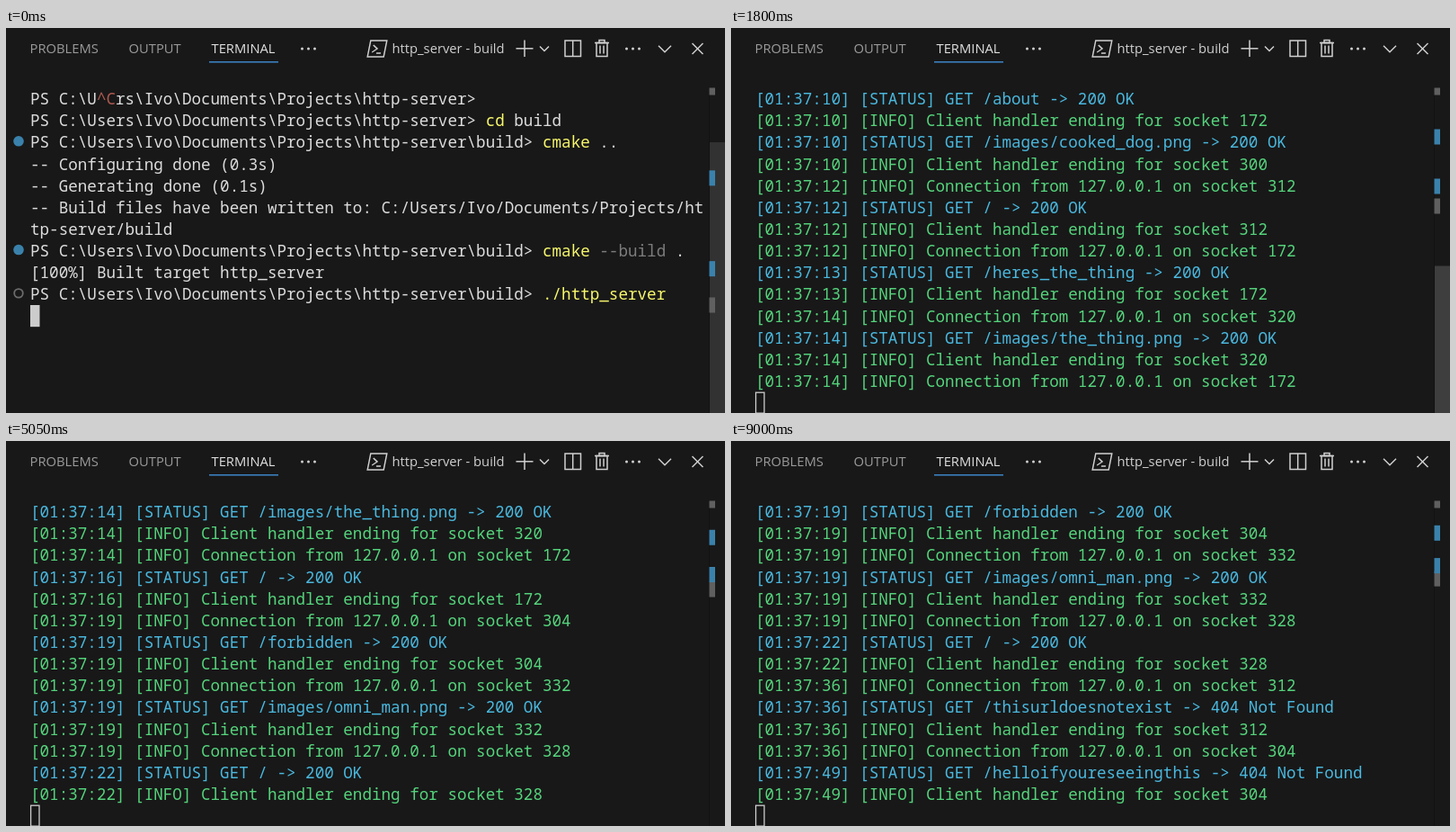
Animation of 800 by 428 pixels, one loop 9050 ms. Source, as an HTML page with a canvas:

```html
<!DOCTYPE html>
<html lang="en">
<head>
<meta charset="utf-8">
<title>Terminal</title>
<style>
  html, body { margin: 0; width: 100%; height: 100%; overflow: hidden; background: #181818; }
  canvas { display: block; }
</style>
</head>
<body>
<canvas id="stage" width="800" height="428"></canvas>
<script>
const ctx = document.getElementById('stage').getContext('2d');
const WIDTH = 800, HEIGHT = 428, LOOP = 9050, STEP = 50;
const LEFT = 27, TOP = 66.5, CHAR = 10.555, ROW = 24.15, VISIBLE_ROWS = 15;
const MONO = '500 17.59px "Noto Sans Mono", "DejaVu Sans Mono", monospace';
const SANS = '14.75px "Open Sans", "Noto Sans", sans-serif';
const BG = '#181818', WHITE = '#dcdcdc', ICON = '#d0d0d0', YELLOW = '#f8f86c', DIM = '#7c7c7c';
const RED = '#b05a52', GREEN = '#55d47c', CYAN = '#4ab8de', BLUE = '#3a82ac', GRAY = '#606060';

// Each row is a list of [text, color] segments.
const home = '\\Ivo\\Documents\\Projects\\http-server';
const prompt = dir => ['PS C:\\Users' + home + dir + '> ', WHITE];
const plain = text => [[text, WHITE]];
const initialRows = [
  [['PS C:\\U', WHITE], ['^C', RED], ['rs' + home + '>', WHITE]],
  [prompt(''), ['cd', YELLOW], [' build', WHITE]],
  [prompt('\\build'), ['cmake', YELLOW], [' ..', WHITE]],
  plain('-- Configuring done (0.3s)'),
  plain('-- Generating done (0.1s)'),
  plain('-- Build files have been written to: C:/Users/Ivo/Documents/Projects/ht'),
  plain('tp-server/build'),
  [prompt('\\build'), ['cmake', YELLOW], [' --build', DIM], [' .', WHITE]],
  plain('[100%] Built target http_server'),
  [prompt('\\build'), ['./http_server', YELLOW]],
];

// "second socket" opens a connection; a path after it answers and closes that connection.
const traffic = `
  07 296 | 07 296 / | 07 172 | 07 300 | 10 172 /about | 10 300 /images/cooked_dog.png
  12 312 | 12 312 / | 12 172 | 13 172 /heres_the_thing
  14 320 | 14 320 /images/the_thing.png | 14 172 | 16 172 /
  19 304 | 19 304 /forbidden | 19 332 | 19 332 /images/omni_man.png | 19 328 | 22 328 /
  36 312 | 36 312 /thisurldoesnotexist | 36 304 | 49 304 /helloifyoureseeingthis`;

const log = traffic.trim().split(/\n|\|/).flatMap(entry => {
  const [second, socket, path] = entry.trim().split(' ');
  const time = (second - 5.4) * 200; // the clock runs five times as fast
  const line = (text, color) => ({ time, row: [[`[01:37:${second}] ${text}`, color]] });
  if (!path) return [line('[INFO] Connection from 127.0.0.1 on socket ' + socket, GREEN)];
  const status = /this|hello/.test(path) ? '404 Not Found' : '200 OK';
  return [
    line(`[STATUS] GET ${path} -> ${status}`, CYAN),
    line('[INFO] Client handler ending for socket ' + socket, GREEN),
  ];
});

function box(color, x, y, w, h) {
  ctx.fillStyle = color;
  ctx.fillRect(x, y, w, h);
}

function outline(color, width, x, y, w, h) {
  ctx.strokeStyle = color;
  ctx.lineWidth = width;
  ctx.strokeRect(x, y, w, h);
}

function line(...points) {
  ctx.strokeStyle = ICON;
  ctx.lineWidth = 1.5;
  ctx.beginPath();
  for (const [x, y] of points) ctx.lineTo(x, y);
  ctx.stroke();
}

function circle(x, y, r) {
  ctx.beginPath();
  ctx.arc(x, y, r, 0, 2 * Math.PI);
}

function label(text, x, color) {
  ctx.font = SANS;
  ctx.fillStyle = color;
  ctx.fillText(text, x, 28.3);
}

function dots(x) {
  ctx.fillStyle = ICON;
  for (const dx of [-7, 0, 7]) { circle(x + dx, 23, 1.5); ctx.fill(); }
}

const chevron = (x, y, r) => line([x - r, y - r / 2], [x, y + r / 2], [x + r, y - r / 2]);

function terminalIcon(x, y) {
  ctx.save();
  ctx.transform(1, 0, -0.2, 1, x, y);
  outline(ICON, 1.5, -9, -9, 18, 18);
  line([-5, -4], [0, 0], [-5, 4]);
  line([0, 5], [5, 5]);
  ctx.restore();
}

function trashIcon(x, y) {
  line([x - 8, y - 6], [x + 8, y - 6]);
  outline(ICON, 1.5, x - 3, y - 9, 6, 3);
  outline(ICON, 1.5, x - 6, y - 6, 12, 15);
  for (const dx of [-2, 2]) line([x + dx, y - 3], [x + dx, y + 6]);
}

function drawHeader() {
  label('PROBLEMS', 26.5, '#9a9a9a');
  label('OUTPUT', 136.5, '#9a9a9a');
  label('TERMINAL', 228.5, '#e0e0e0');
  box('#3a7fbd', 226, 37, 77, 1.6);
  dots(336.5);
  terminalIcon(413, 23);
  label('http_server - build', 429.5, ICON);
  line([577, 13.5], [577, 32]);
  line([567.5, 22.8], [586.5, 22.8]);
  chevron(599, 23, 5);
  outline(ICON, 1.5, 622, 14, 17.5, 17.5);
  line([630.7, 14], [630.7, 31.5]);
  trashIcon(663, 22.5);
  dots(697.5);
  chevron(733, 23.3, 7);
  for (const d of [-6, 6]) line([769.5 - d, 23 - 6], [769.5 + d, 23 + 6]);
}

function drawRow(segments, y) {
  ctx.font = MONO;
  let x = LEFT;
  for (const [text, color] of segments) {
    ctx.fillStyle = color;
    for (const char of text) {
      ctx.fillText(char, x, y + 18.6);
      x += CHAR;
    }
  }
}

function drawScrollbar(scroll, opacity) {
  const above = scroll + 3, total = above + VISIBLE_ROWS;
  const yOf = row => TOP + 363 * row / total;
  box('#121212', 782, TOP, 1, HEIGHT);
  box(`rgba(121,121,121,${0.4 * opacity})`, 783, yOf(above), 17, HEIGHT);
  for (const [row, color] of [[0, GRAY], [12, GRAY], [5, BLUE], [10, BLUE]]) {
    const top = Math.max(TOP, yOf(row) - 9);
    box(color, 782.5, top, 6.5, yOf(row) + 8 - top);
  }
}

// Dots beside the commands: filled when done, hollow while running.
function drawMarkers(scroll) {
  for (const row of [2, 7, 9]) {
    if (row < scroll) continue;
    const running = row === 9;
    circle(14, TOP + ROW * (row - scroll) + 11, running ? 4.8 : 5.8);
    ctx.fillStyle = BLUE;
    ctx.strokeStyle = '#6c6c6c';
    ctx.lineWidth = 1.8;
    running ? ctx.stroke() : ctx.fill();
  }
}

function draw(now) {
  const t = Math.floor(now % LOOP / STEP) * STEP;
  const shown = log.filter(entry => entry.time <= t);
  const rows = [...initialRows, ...shown.map(entry => entry.row)];
  const scroll = Math.max(0, rows.length + 1 - VISIBLE_ROWS);
  const lastScroll = shown.length ? shown.at(-1).time : -150;
  const sliderOpacity = Math.max(0, Math.min(1, 1 - (t - lastScroll - 100) / 160));

  box(BG, 0, 0, WIDTH, HEIGHT);
  drawHeader();
  drawScrollbar(scroll, sliderOpacity);
  drawMarkers(scroll);
  rows.slice(scroll).forEach((row, i) => drawRow(row, TOP + ROW * i));

  // The cursor is hollow once the terminal loses focus.
  const cursorY = TOP + ROW * (rows.length - scroll);
  if (t < 250) box('#cccccc', LEFT, cursorY, 10.5, ROW);
  else outline('#cccccc', 1.3, LEFT + 0.6, cursorY + 0.6, 9.4, ROW - 1.2);
}

const start = performance.now();
function tick() {
  draw(performance.now() - start);
  requestAnimationFrame(tick);
}
tick();
</script>
</body>
</html>
```
